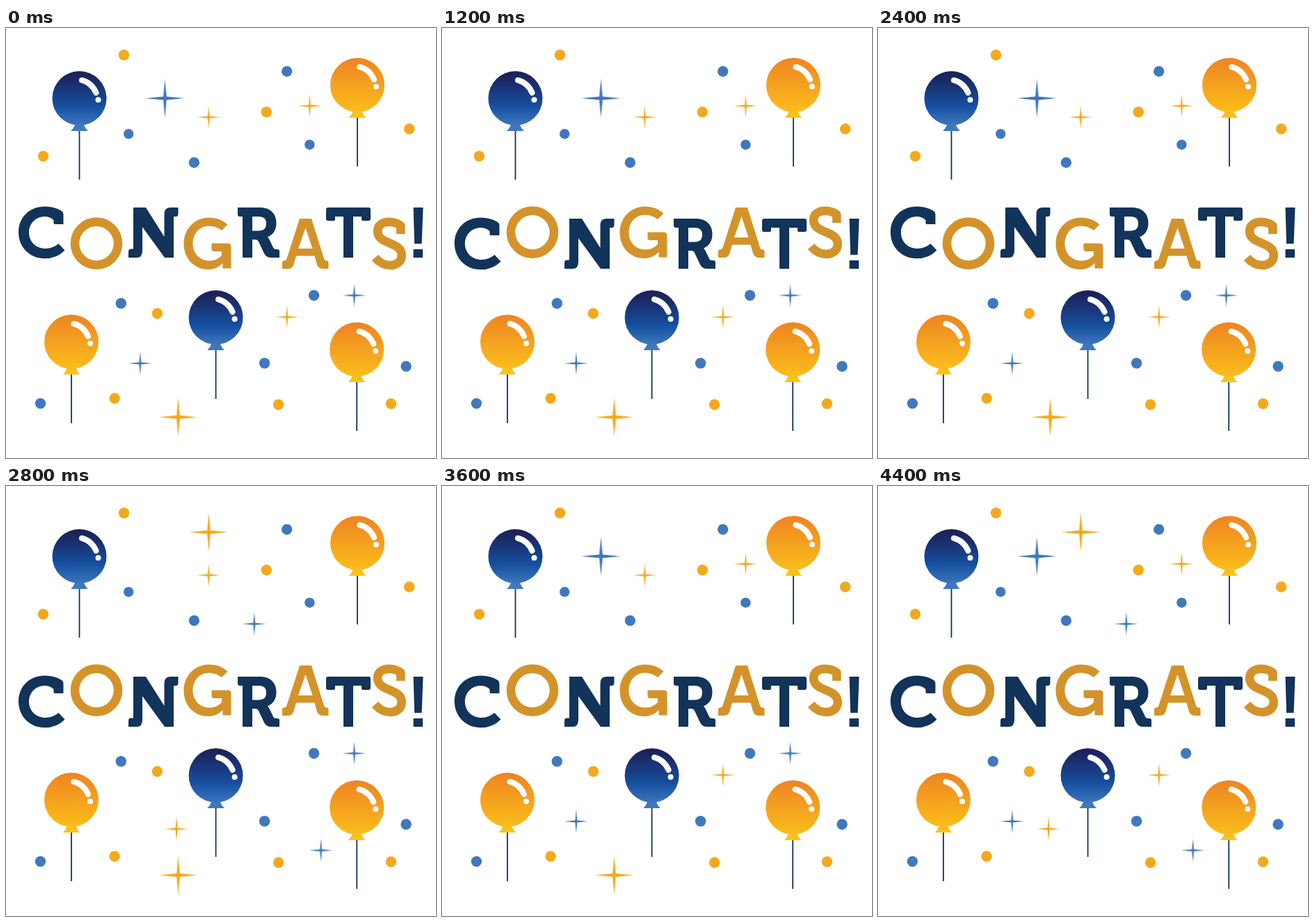
Write an HTML page that moves like this. It is 618 px wide and 618 px high and loops after 4.8 s.

```html
<!DOCTYPE html>
<html lang="en">
<head>
<meta charset="utf-8">
<title>Congrats!</title>
<style>
  html, body { margin: 0; width: 100%; height: 100%; overflow: hidden; background: #fff; }
  svg { display: block; width: 618px; height: 618px; }
  .navy { fill: #12335a; }
  .gold { fill: #d3932a; }
  .line { fill: none; stroke: #d3932a; stroke-width: 12.6; stroke-linejoin: round; }
</style>
</head>
<body>
<svg viewBox="0 0 618 618" role="img" aria-label="Congrats!">
  <defs>
    <linearGradient id="blueFill" gradientUnits="userSpaceOnUse" x1="0" y1="-39" x2="0" y2="47">
      <stop offset="0" stop-color="#1b1f55"/>
      <stop offset=".16" stop-color="#1b2a66"/>
      <stop offset=".58" stop-color="#154f9f"/>
      <stop offset=".92" stop-color="#3f78bf"/>
    </linearGradient>
    <linearGradient id="orangeFill" gradientUnits="userSpaceOnUse" x1="0" y1="-39" x2="0" y2="47">
      <stop offset="0" stop-color="#ee8423"/>
      <stop offset="1" stop-color="#fcc419"/>
    </linearGradient>
    <g id="balloon">
      <path d="M0 46V117" stroke="#12335a" stroke-width="1.8"/>
      <path d="M-6 37H6Q8 43 12.3 47H-12.3Q-8 43 -6 37Z"/>
      <circle r="39"/>
      <path d="M3.5 -26Q17.500 -22.500 24 -8" fill="none" stroke="#fff" stroke-width="8" stroke-linecap="round"/>
      <circle cx="27" cy="2.300" r="4" fill="#fff"/>
    </g>
  </defs>
  <g id="scene"></g>
  <g id="navyLetters" class="navy" fill-rule="evenodd">
    <path d="M82.500 282H70Q68.500 282 68.500 280V276Q63 271 56 271C42.500 271 33 281 33 294S43 317 57 317Q67 317 75.500 310L84.500 319.500Q73 331.300 56 331.300C34 331.300 18 315 18 293.500S34 256.500 56 256.500Q70 256.500 80 263Q82.500 265 82.500 267.500Z"/>
    <path d="M183 258H201L227.500 300V268Q227.500 258 236 258H247.500V267Q247.500 271 244 271H241V330H228L196 286V320Q196 330 188 330H176V321Q176 317.500 180 317.500H183Z"/>
    <path d="M333 258H365C380 258 388.500 267 388.500 280Q388.500 295 376 300.500Q378 302.500 379.500 306L384 315.500Q385 318 388 318H390Q393 318 393 321V330H381Q374 330 371 324L363 307Q361.500 304 358 304H354V330H340V271H336.500Q333 271 333 268ZM354 271V291.500H363Q374 291.500 374 281T363 271Z"/>
    <path d="M463 258H521Q524 258 524 261V274Q524 277 521 277H513Q511 277 511 275V271H499V330H485V271H473V275Q473 277 471 277H463Q460 277 460 274V261Q460 258 463 258Z"/>
    <path d="M585.500 258H599.500L597.500 310H587ZM585.500 318H599V330H585.500Z"/>
  </g>
  <g id="goldLetters" class="gold" fill-rule="evenodd">
    <circle class="line" cx="130" cy="293.600" r="31"/>
    <path d="M318.500 266.500L310 275Q302 268.500 292 268.500C278 268.500 268.500 279.500 268.500 294S279 318.500 292.500 318.500Q303 318.500 310 311V305H299Q295.500 305 295.500 301.500V293.500H319Q323.500 293.500 323.500 298V329.500H311.500V322Q303 331 291 331C270 331 255.500 315 255.500 294S271 256.500 292 256.500Q308 256.500 318.500 266.500Z"/>
    <path d="M422 258H439L457 315.500Q458 318.500 461 318.500Q463.500 318.500 463.500 321V330H456Q449 330 447 324L443.500 311.500H417L413.500 324Q411.500 330 405 330H397V321Q397 318.500 399.500 318.500Q402.500 318.500 403.500 315.500ZM430.500 271L420 301H440.500Z"/>
    <path class="line" d="M530.500 314Q540 325 552 325C562 325 568.700 319 568.700 311C568.700 300 560 297 551 293C541 289 534 285 534 276C534 267 542 262.700 551 262.700Q560 262.700 567.300 268V280"/>
  </g>
</svg>
<script>
const STEP = 400;
const BLUE = '#3f78bf', YELLOW = '#f4a91c';
const scene = document.getElementById('scene');

function add(tag, attrs) {
  const el = document.createElementNS('http://www.w3.org/2000/svg', tag);
  for (const k in attrs) el.setAttribute(k, attrs[k]);
  return scene.appendChild(el);
}

// Hold each value for one step, then jump to the next.
function cycle(el, prop, values) {
  const frames = [...values, values[0]].map(v => ({ [prop]: v, easing: 'step-end' }));
  el.animate(frames, { duration: STEP * values.length, iterations: Infinity });
}

const dots = {
  [BLUE]: [[403.7, 62.4], [176.2, 152.2, 7.2], [270.4, 193.4], [436.4, 167.7, 7.2], [165.3, 395.7],
    [442.6, 384.3], [371.6, 481.8], [575, 486.3], [49.5, 539.6]],
  [YELLOW]: [[169.5, 38.8], [53.5, 184.3], [374.3, 120.7], [579.6, 145], [217.4, 410.2],
    [156.1, 532.2], [391.6, 541.3], [553.4, 540]]
};
for (const fill in dots)
  for (const [cx, cy, r = 7.7] of dots[fill]) add('circle', { cx, cy, r, fill });

const balloons = [
  ['blue', 105.5, 101], ['blue', 301.6, 416],
  ['orange', 505, 82], ['orange', 94, 451], ['orange', 504.2, 462]
];
for (const [name, x, y] of balloons)
  add('use', { href: '#balloon', transform: `translate(${x} ${y})`, fill: `url(#${name}Fill)` });

// Colour, centre, arm length, and the step in which the star is hidden.
const stars = [
  [BLUE, 228.4, 101, 28, 1], [YELLOW, 291.5, 66.3, 28, 0], [YELLOW, 291.3, 128.2, 17, 2],
  [BLUE, 356.8, 198.2, 17, 0], [YELLOW, 436.4, 112, 17, 1], [BLUE, 500.5, 384.3, 17, 2],
  [YELLOW, 403.8, 415.4, 17, 1], [BLUE, 192.8, 482, 17, 1], [YELLOW, 245, 492.8, 17, 0],
  [BLUE, 452.6, 523.6, 17, 0], [YELLOW, 247.5, 559.3, 28, 2]
];
for (const [fill, x, y, r, off] of stars) {
  const w = r * 0.085;
  const star = add('path', {
    fill, transform: `translate(${x} ${y})`,
    d: `M0 ${-r}L${w} ${-w}L${r} 0L${w} ${w}L0 ${r}L${-w} ${w}L${-r} 0L${-w} ${-w}Z`
  });
  cycle(star, 'opacity', [0, 1, 2].map(i => i === off ? 0 : 1));
}

const up = 'translateY(0px)', down = 'translateY(16px)';
cycle(document.getElementById('navyLetters'), 'transform', [up, down]);
cycle(document.getElementById('goldLetters'), 'transform', [down, up]);
</script>
</body>
</html>
```
